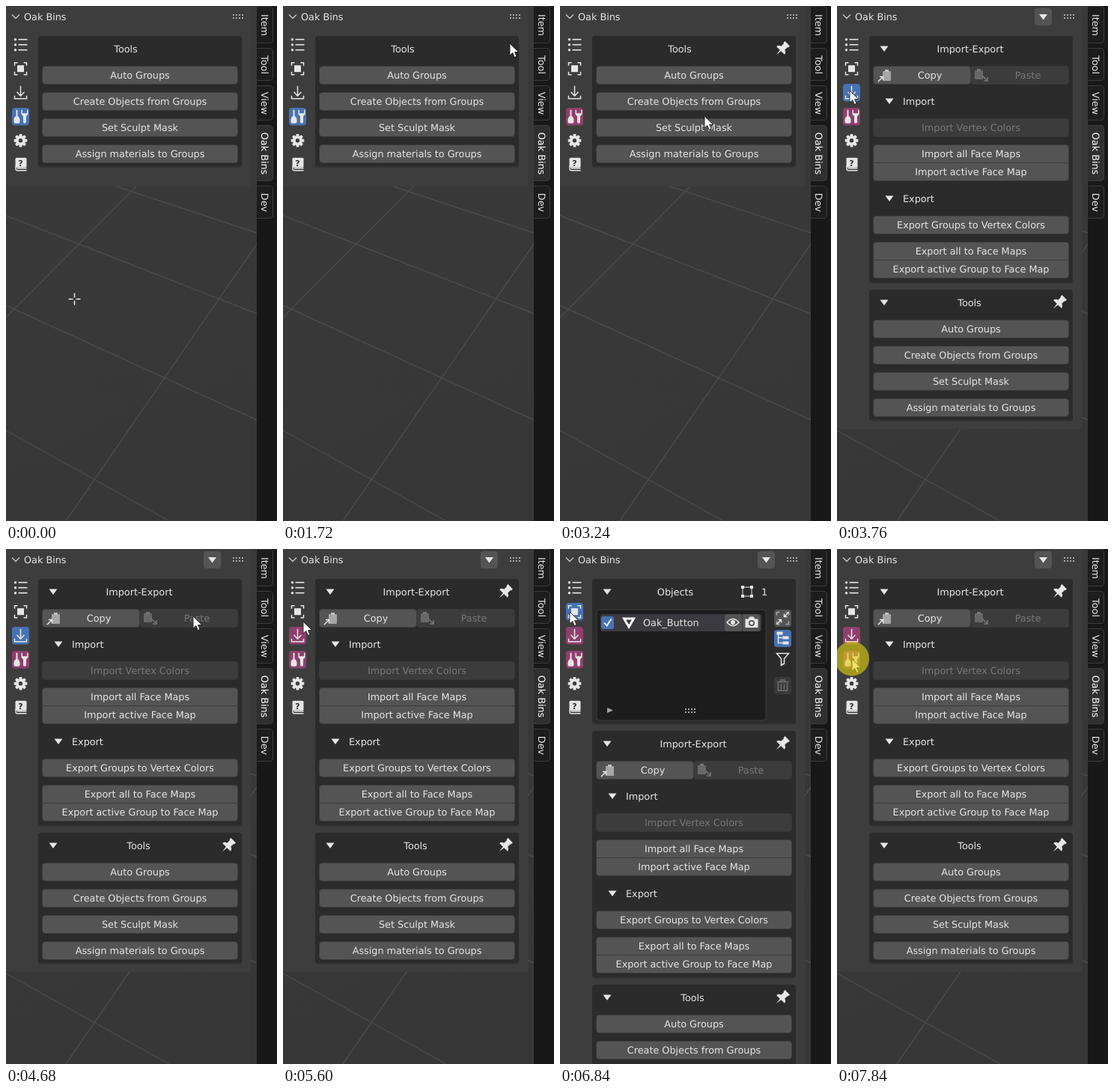
Recreate the animation shown at these times as an HTML page. Size 362 by 688 pixels, loop 8000 ms.

```html
<!DOCTYPE html>
<html lang="en">
<head>
<meta charset="utf-8">
<title>Add-on panel</title>
<style>
html, body { margin: 0; width: 100%; height: 100%; overflow: hidden; background: #393939; }
svg { display: block; width: 362px; height: 688px; }
text { font: 12.8px "DejaVu Sans", sans-serif; white-space: pre; text-rendering: geometricPrecision; }
</style>
</head>
<body>
<svg id="stage" viewBox="0 0 362 688" xmlns="http://www.w3.org/2000/svg"></svg>
<script>
const LOOP = 8000, REACT = 80;
const NAME = 'Oak Bins';
const BLUE = '#4772b3', PINK = '#8f3f6d', GREY = '#545454', HOVER = '#656565', LIGHT = '#e6e6e6', DIM = '#a6a6a6';
const stage = document.getElementById('stage');

// Pointer moves; "hold" is how long the click ring stays after arrival
const moves = [
  { from: 1040, to: 1720, x: 303, y: 50 },
  { from: 1840, to: 1920, x: 295, y: 50, hold: 280, pin: 'tools' },
  { from: 2360, to: 2560, x: 303, y: 58 },
  { from: 2920, to: 3680, x: 17, y: 113, sag: 72, hold: 80, tab: 'io' },
  { from: 4040, to: 4920, x: 301, y: 52, sag: 45, hold: 480, pin: 'io' },
  { from: 5400, to: 5600, x: 27, y: 97 },
  { from: 5640, to: 6200, x: 17, y: 54, hold: 80, tab: 'groups' },
  { from: 6400, to: 6720, x: 13, y: 84, hold: 80, tab: 'objects' },
  { from: 7400, to: 7760, x: 20, y: 147, hold: 300, tab: 'tools' }
];
const sections = ['groups', 'objects', 'io', 'tools'];
const heights = { groups: 240, objects: 195, io: 331, tools: 176 };

let mouse;

function stateAt(t) {
  const s = { x: 92, y: 392, tab: 'tools', pinned: new Set(), click: false };
  for (const m of moves) {
    const k = Math.min(1, Math.max(0, (t - m.from) / (m.to - m.from)));
    const e = k * k * (3 - 2 * k);
    s.x += (m.x - s.x) * e;
    s.y += (m.y - s.y) * e + (m.sag || 0) * 4 * e * (1 - e);
    if (t >= m.to && t < m.to + (m.hold || 0)) s.click = true;
    if (t >= m.to + REACT) {
      if (m.tab) s.tab = m.tab;
      if (m.pin) s.pinned.add(m.pin);
    }
  }
  s.x = Math.round(s.x);
  s.y = Math.round(s.y);
  return s;
}

const rect = (x, y, w, h, fill, r = 0, more = '') =>
  `<rect x="${x}" y="${y}" width="${w}" height="${h}" rx="${r}" fill="${fill}" ${more}/>`;
const text = (s, x, y, anchor = 'middle', fill = LIGHT) =>
  `<text x="${x}" y="${y + 4.7}" text-anchor="${anchor}" fill="${fill}">${s}</text>`;
const at = (x, y, body, more = '') => `<g transform="translate(${x} ${y}) ${more}">${body}</g>`;
const shape = (d, c = LIGHT) => `<path d="${d}" fill="${c}"/>`;
const line = (d, c = LIGHT, w = 1.5) => `<path d="${d}" fill="none" stroke="${c}" stroke-width="${w}"/>`;
const dot = (r, c = LIGHT, x = 0, y = 0) => `<circle cx="${x}" cy="${y}" r="${r}" fill="${c}"/>`;
const over = (x, y, w, h) => mouse.x >= x && mouse.x < x + w && mouse.y >= y && mouse.y < y + h;
const arrow = (x, y) => at(x, y, shape('M-5.5-3.5h11L0 4z'));
const edge = 'stroke="#3b3b3b" stroke-width=".8"';
const grip = (x, y) => [...Array(8).keys()].map(i => rect(x + (i % 4) * 4, y + (i >> 2) * 4, 2, 2, DIM)).join('');

function button(label, y, x = 48.5, w = 261, on = true, cx = x + w / 2) {
  const c = !on ? '#3c3c3c' : over(x, y - 12, w, 24) ? HOVER : GREY;
  return rect(x, y - 11.5, w, 24, c, 4, edge) + text(label, cx, y, 'middle', on ? LIGHT : '#777');
}

const pair = (a, b, y) => rect(48.5, y - 11.5, 261, 48, GREY, 4, edge) +
  [a, b].map((s, i) => text(s, 179, y + i * 24)).join('') + rect(49, y + 12, 260, 1, '#3b3b3b');

const pin = y => at(297, y, shape('M-4.500-9.500h9v3h-1V-1q4 1 4 4.500H1L0 11.500-1 3.500h-6.500q0-3.500 4-4.500v-5.500h-1z'), 'rotate(45)');
const corners = (r, k, c) => [0, 90, 180, 270].map(a =>
  `<g transform="rotate(${a})">${line(`M${-r} ${-k}V${-r}H${-k}`, c)}</g>`).join('');

const icons = {
  groups: [-7, 0, 7].map(y => dot(1.7, LIGHT, -7, y) + rect(-3, y - .8, 12, 1.6, LIGHT)).join(''),
  objects: corners(8, 4, LIGHT) + rect(-4.5, -4.5, 9, 9, LIGHT),
  io: line('M0-9V4M-5-1L0 4.5 5-1M-8 4V8H8V4'),
  tools: shape('M-6-9h2v8q3 2 3 5v3q0 2-2 2h-4q-2 0-2-2V4q0-3 3-5z') +
    shape('M1-9v6l2.5 2.5V7q0 2 2 2t2-2V-.5L10-3v-6H8.5v4.5h-6V-9z'),
  gear: [0, 45, 90, 135].map(a => rect(-2, -8.8, 4, 17.6, LIGHT, 1, `transform="rotate(${a})"`)).join('') +
    dot(6.5) + dot(2.7, '#3d3d3d'),
  help: rect(-7, -9, 15, 13, LIGHT, 1.5) + line('M-6.5 2v4q0 2 2 2H8M-5 5H8', LIGHT, 1.4) +
    '<text y="2" text-anchor="middle" style="font-size:11px;font-weight:bold" fill="#333">?</text>'
};

function viewport() {
  const lines = 'M174 241L0 416M335 318L80 688M147 241L335 303M0 280L335 411M0 400L335 553M0 567L218 688';
  return rect(0, 0, 362, 688, 'url(#view)') + line(lines, '#4b4b4b', 1.4);
}

function sideTabs() {
  let y = 0, out = rect(335, 0, 27, 688, '#181818');
  for (const [label, h] of [['Item', 50], ['Tool', 44], ['View', 47], [NAME, 75], ['Dev', 44]]) {
    const on = label === NAME;
    out += `<path d="M335 ${y + .5}h17q4.5 0 4.5 4.5v${h - 10}q0 4.5-4.5 4.5h-17" fill="${on ? '#303030' : '#1d1d1d'}" stroke="#3c3c3c"/>` +
      at(341, y + h / 2 + .5, `<text text-anchor="middle" fill="${on ? '#fff' : LIGHT}">${label}</text>`, 'rotate(90)');
    y += h + 6;
  }
  return out;
}

function sideIcons(s) {
  return Object.keys(icons).map((id, i) => {
    const y = 52 + i * 32;
    const bg = s.pinned.has(id) ? PINK : id === s.tab ? BLUE : over(8, y - 12, 23, 24) ? GREY : '';
    return (bg && rect(8, y - 12, 23, 23.5, bg, 4)) + at(19.5, y - .3, icons[id]);
  }).join('');
}

const listBox = h => rect(49, 81, 226, h, '#1d1d1d', 4, 'stroke="#3d3d3d"') +
  shape(`M63 ${h - 17 + 81}l8 3.5-8 3.5z`, DIM) + grip(167, h + 65);

const bodies = {
  groups: () => text('Groups', 154, 57) + listBox(193),

  objects: () => text('Objects', 154, 57) +
    at(250, 57, rect(-6, -6, 12, 12, 'none', 0, `stroke="${LIGHT}" stroke-dasharray="8 4" stroke-dashoffset="-2"`) +
      [-6, 6].map(x => rect(x - 2, -8, 4, 4, LIGHT) + rect(x - 2, 4, 4, 4, LIGHT)).join('')) +
    text('1', 273, 57) + listBox(148) +
    rect(54, 87, 215, 23, '#3a3a40', 3) +
    rect(55, 90, 17, 17, BLUE, 3) + line('M59 98.5l3.5 4 6-9', '#fff', 1.8) +
    line('M85.5 93H98.5L92 104z', '#fff', 3) +
    text('Oak_Button', 111, 98, 'start') +
    rect(220, 87, 23, 23, GREY, 3) + rect(244, 87, 23, 23, GREY, 3) +
    at(231, 98, line('M-8 0Q0-9 8 0Q0 9-8 0z') + dot(3)) +
    at(256, 98, shape('M-8.5-4.5h4l2-3h5l2 3h4V7h-17z') + dot(4, GREY, 0, 1) + dot(2.3, LIGHT, 0, 1)) +
    rect(286, 81, 23, 23, GREY, 4) +
    at(297.5, 92.5, corners(8, 4, DIM) + line('M8-8L2-2M2-6V-2H6M-8 8L-2 2M-6 2H-2V6')) +
    rect(286, 108, 23, 23, BLUE, 4) +
    at(297.5, 119.5, line('M-6-7V6H0M-6-1H0') + rect(-8, -9, 8, 4, LIGHT) + rect(0, -3, 8, 4, LIGHT) + rect(0, 4, 8, 4, LIGHT)) +
    line('M289.5 139.5h16l-6 7v6.5l-4 2.5v-9z') +
    rect(286, 171, 23, 23, '#3a3a3a', 4) +
    line('M290 177.5h15M295 177v-2h5v2M291.5 179v10h12v-10M295.5 180v7M299.5 180v7', '#757575', 1.3),

  io: () => text('Import-Export', 178, 57) +
    button('Copy', 92, 48.5, 130, true, 124) + button('Paste', 92, 178.5, 131, false, 255) +
    at(64, 93, rect(-3, -6, 11, 13, DIM, 1) + rect(0, -8, 5, 3, '#c0c0c0') + line('M-9 8L-3 2M-7 1.5H-2.5V6')) +
    at(192, 92, rect(-8, -6, 11, 12, '#686868', 1) + rect(-5, -8, 5, 3, '#777') + line('M2 1L9 8M4 8H9V3', '#777')) +
    arrow(70, 127) + text('Import', 88, 127, 'start') +
    button('Import Vertex Colors', 162, 48.5, 261, false) +
    pair('Import all Face Maps', 'Import active Face Map', 197) +
    arrow(70, 257) + text('Export', 88, 257, 'start') +
    button('Export Groups to Vertex Colors', 292) +
    pair('Export all to Face Maps', 'Export active Group to Face Map', 327),

  tools: many => text('Tools', many ? 177 : 160, 57) +
    ['Auto Groups', 'Create Objects from Groups', 'Set Sculpt Mask', 'Assign materials to Groups']
      .map((s, i) => button(s, 92 + i * 35)).join('')
};

function panels(s, shown) {
  const many = shown.length > 1;
  let dy = 0, out = '';
  for (const id of shown) {
    mouse = { x: s.x, y: s.y - dy };
    out += at(0, dy, rect(43, 44, 272, heights[id] - 4, '#343434', 4) +
      rect(43, 40, 272, heights[id] - 2, '#2b2b2b', 4) +
      bodies[id](many) + (many ? arrow(63, 57) : '') + (s.pinned.has(id) ? pin(57) : ''));
    dy += heights[id] + 8;
  }
  mouse = s;
  return { out, bottom: Math.max(241, dy + 42) };
}

function cursor({ x, y }) {
  if (y > 241) {
    const d = 'M-8 0H-2M2 0H8M0-8V-2M0 2V8';
    return at(x - .5, y - .5, line(d, '#222', 3) + line(d, '#fff', 1.5));
  }
  return at(x, y, '<path d="M0 0V16L3.8 12.5 6.3 18.5 9 17.3 6.5 11.5H11.7z" fill="#fff" stroke="#222" stroke-width=".9"/>');
}

function draw(t) {
  const s = mouse = stateAt(t);
  const shown = sections.filter(id => id === s.tab || s.pinned.has(id));
  const { out, bottom } = panels(s, shown);
  return '<defs><linearGradient id="view" x2=".3" y2="1"><stop stop-color="#3a3a3a"/><stop offset="1" stop-color="#373737"/></linearGradient></defs>' +
    viewport() + rect(0, 0, 327, bottom, '#3d3d3d') + out +
    line('M8 11.5l5 5 5-5', '#c8c8c8', 1.3) + text(NAME, 24, 14, 'start') + grip(303, 11) +
    (shown.length > 1 ? rect(264, 3, 23, 23, GREY, 4) + arrow(275.5, 14.5) : '') +
    sideIcons(s) + sideTabs() + cursor(s) +
    (s.click ? `<circle cx="${s.x}" cy="${s.y - .5}" r="23" fill="#e0d010" opacity=".62"/>` : '');
}

let last = '';
function tick() {
  const markup = draw(performance.now() % LOOP);
  if (markup !== last) stage.innerHTML = last = markup;
  requestAnimationFrame(tick);
}
tick();
</script>
</body>
</html>
```
